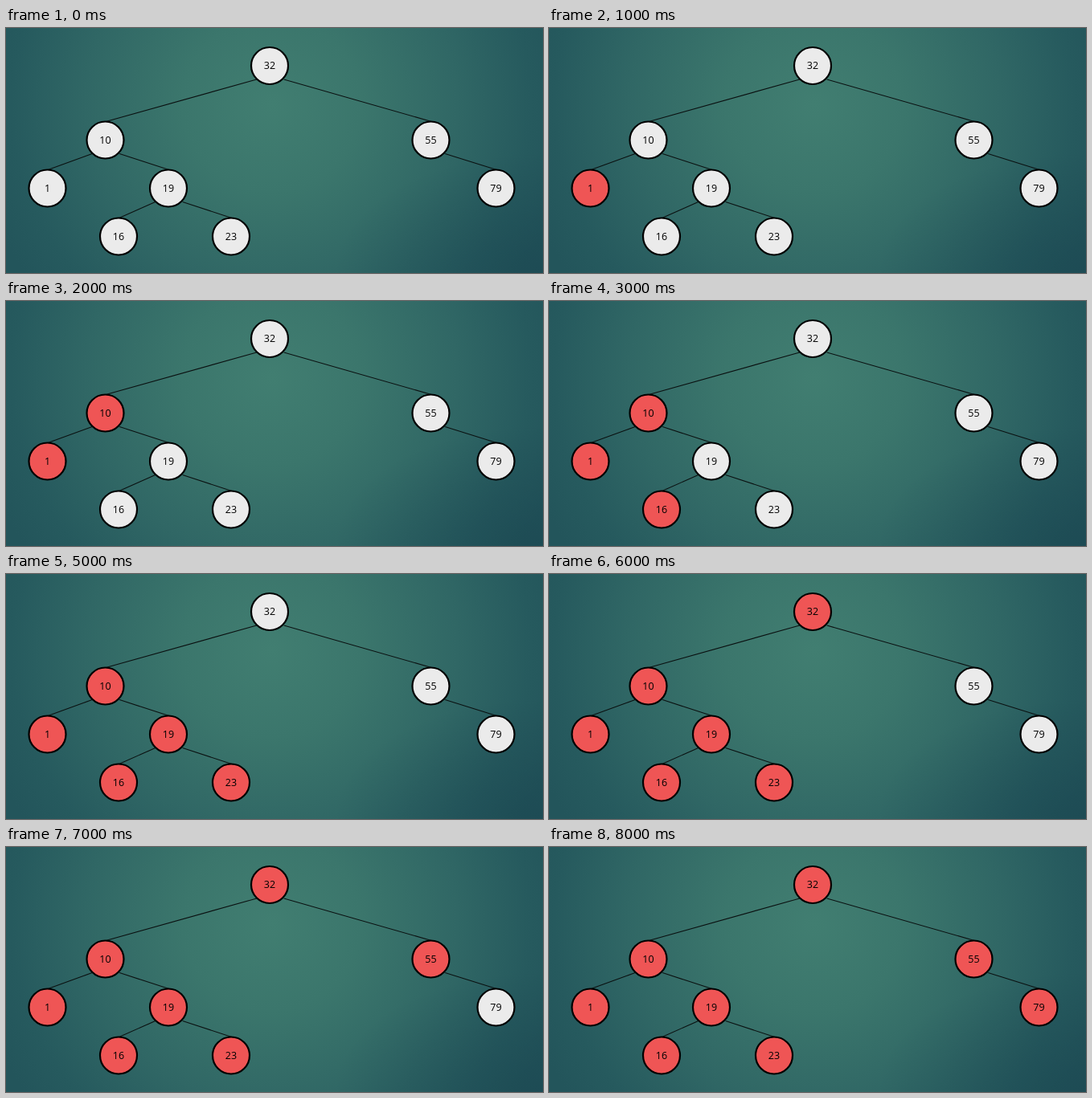
Write an HTML page that moves like this. It is 668x305 px and loops after 9000 ms.

```html
<!DOCTYPE html>
<html lang="en">
<head>
<meta charset="utf-8">
<title>In-order traversal</title>
<style>
  html, body { margin: 0; width: 100%; height: 100%; overflow: hidden; }
  body {
    background:
      radial-gradient(ellipse 260px 150px at 100% 100%, rgba(24, 66, 78, .5), rgba(24, 66, 78, 0)),
      radial-gradient(ellipse 375px 365px at 330px 95px, #417e71, #3b766c 30%, #306765 62%, #265a5e 86%, #23555b);
  }
  svg { display: block; }
  line { stroke: #0a1010; stroke-width: 1.1; }
  circle { stroke: #000; stroke-width: 2.2; }
  text { font: 12.5px "Open Sans", sans-serif; text-anchor: middle; }
</style>
</head>
<body>
<svg id="tree" width="668" height="305"></svg>
<script>
const STEP = 1000, LOOP = 9000, RADIUS = 23, ANCHOR = 17;
const svg = document.getElementById("tree");

const node = (value, x, left, right) => ({ value, x, left, right });
const root = node(32, 328,
  node(10, 123.5,
    node(1, 51.5),
    node(19, 202, node(16, 140), node(23, 280))),
  node(55, 528.5, null, node(79, 609.5)));

const levelY = depth => depth ? 79.5 + 60 * depth : 47;

function add(name, attrs, label = "") {
  const el = document.createElementNS("http://www.w3.org/2000/svg", name);
  for (const key in attrs) el.setAttribute(key, attrs[key]);
  el.textContent = label;
  return svg.appendChild(el);
}

function link(parent, child, side, depth) {
  if (!child) return;
  add("line", {
    x1: parent.x + side * ANCHOR + 0.7, y1: levelY(depth) + ANCHOR,
    x2: child.x + 0.7, y2: levelY(depth + 1) - RADIUS
  });
}

// Draws a subtree and returns its discs in visiting order.
function grow(item, depth = 0) {
  if (!item) return [];
  const { value, x, left, right } = item, y = levelY(depth);
  link(item, left, -1, depth);
  link(item, right, 1, depth);
  const disc = add("circle", { cx: x, cy: y, r: RADIUS });
  add("text", { x, y: y + 4 }, value);
  return [...grow(left, depth + 1), disc, ...grow(right, depth + 1)];
}

const discs = grow(root);

function draw() {
  const visited = Math.floor(performance.now() % LOOP / STEP);
  discs.forEach((disc, i) => disc.setAttribute("fill", i < visited ? "#ef5555" : "#ebebeb"));
  requestAnimationFrame(draw);
}
draw();
</script>
</body>
</html>
```
